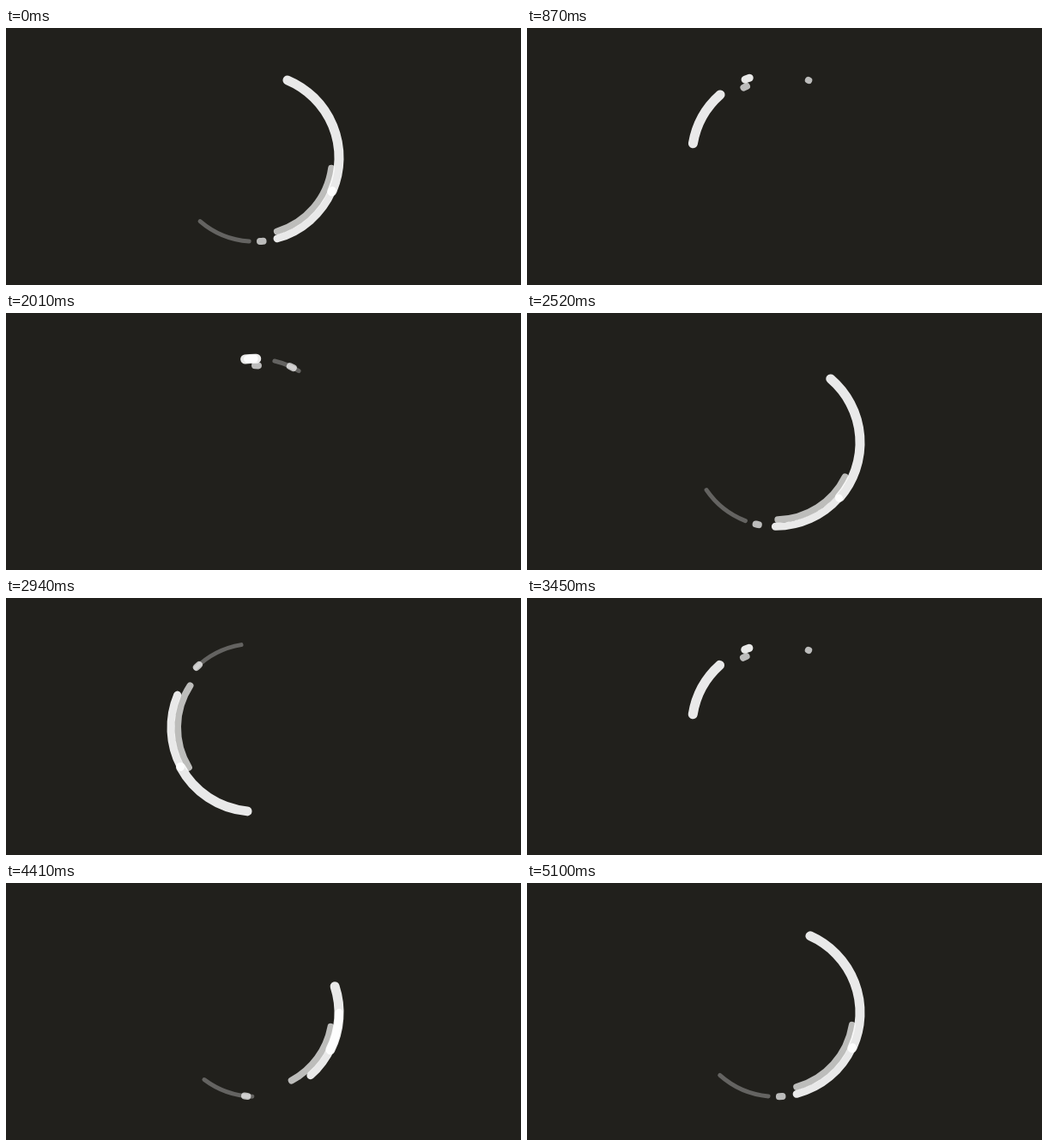
Write an HTML page with a canvas that moves like this. It is 600 by 300 pixels and loops after 5130 ms.

```html
<!DOCTYPE html>
<html lang="en">
<head>
<meta charset="utf-8">
<title>Ring loader</title>
<style>
  html, body { margin: 0; width: 100%; height: 100%; overflow: hidden; background: #21201c; }
  canvas { display: block; }
</style>
</head>
<body>
<canvas id="stage" width="600" height="300"></canvas>
<script>
const ctx = document.getElementById('stage').getContext('2d');
const LOOP = 5130, SLOT = 30, CYCLE = 1275.4, TURN = 720;
const CX = 290, CY = 151.3;

// Pose times within a cycle; each arc makes two counter-clockwise turns per cycle.
const TIMES = [0, 382, 571.5, 744.7, 884];

// Head and tail angles in degrees, counter-clockwise from three o'clock.
const ARCS = [
  { r: 98, width: 5, alpha: 0.3,
    head: [-94, 134.8, 268.2, 436.5, 428], tail: [-130.7, 99.3, 233, 418.6, 428] },
  { r: 98, width: 8, alpha: 0.7,
    head: [-84.4, 134, 265, 425.4, 427.3], tail: [-86.5, 131.5, 263, 422.8, 427] },
  { r: 90, width: 8, alpha: 0.7,
    head: [-8, 211, 349.4, 450, 474.7], tail: [-73.3, 147, 298.4, 447.5, 472.2] },
  { r: 98, width: 9, alpha: 0.9,
    head: [-23, 208, 360, 455, 471.5], tail: [-74.6, 157, 311.5, 450.5, 468.3] },
  { r: 98, width: 11, alpha: 0.9,
    head: [67.2, 264.7, 378.2, 456.7, 530.3], tail: [-23.8, 208, 333.7, 449, 491.5] }
];

const mod = (a, n) => ((a % n) + n) % n;

// Keys repeat every cycle, shifted by whole turns.
function key(values, i) {
  const n = TIMES.length, lap = Math.floor(i / n), j = mod(i, n);
  return { t: TIMES[j] + lap * CYCLE, v: values[j] + lap * TURN };
}

function slope(values, i) {
  const a = key(values, i), b = key(values, i + 1);
  return (b.v - a.v) / (b.t - a.t);
}

// Harmonic mean keeps the motion from overshooting.
function tangent(values, i) {
  const a = slope(values, i - 1), b = slope(values, i);
  return a * b <= 0 ? 0 : 2 * a * b / (a + b);
}

function angleAt(values, t) {
  let i = TIMES.length - 1;
  while (TIMES[i] > t) i--;
  const a = key(values, i), b = key(values, i + 1);
  const h = b.t - a.t, s = (t - a.t) / h, q = 1 - s;
  return a.v * (1 + 2 * s) * q * q + b.v * s * s * (3 - 2 * s)
    + h * s * q * (tangent(values, i) * q - tangent(values, i + 1) * s);
}

// The picture advances in 30 ms slots, with a doubled slot at regular spacing.
function stepped(ms) {
  const slot = Math.floor(mod(ms, LOOP) / SLOT);
  const held = mod(7 * (slot - 68) + 3, 40) < 7;
  return (held ? slot - 1 : slot) * SLOT;
}

function draw(ms) {
  const t = stepped(ms);
  const phase = mod(t + 16 * Math.sin(2 * Math.PI * t / LOOP), CYCLE);
  ctx.fillStyle = '#21201c';
  ctx.fillRect(0, 0, 600, 300);
  ctx.lineCap = 'round';
  for (const arc of ARCS) {
    const head = angleAt(arc.head, phase), tail = angleAt(arc.tail, phase);
    if (head - tail < 0.1) continue;
    ctx.strokeStyle = `rgba(255, 255, 255, ${arc.alpha})`;
    ctx.lineWidth = arc.width;
    ctx.beginPath();
    ctx.arc(CX, CY, arc.r, -head * Math.PI / 180, -tail * Math.PI / 180);
    ctx.stroke();
  }
}

const start = performance.now();
function tick() {
  draw(performance.now() - start);
  requestAnimationFrame(tick);
}
tick();
</script>
</body>
</html>
```
